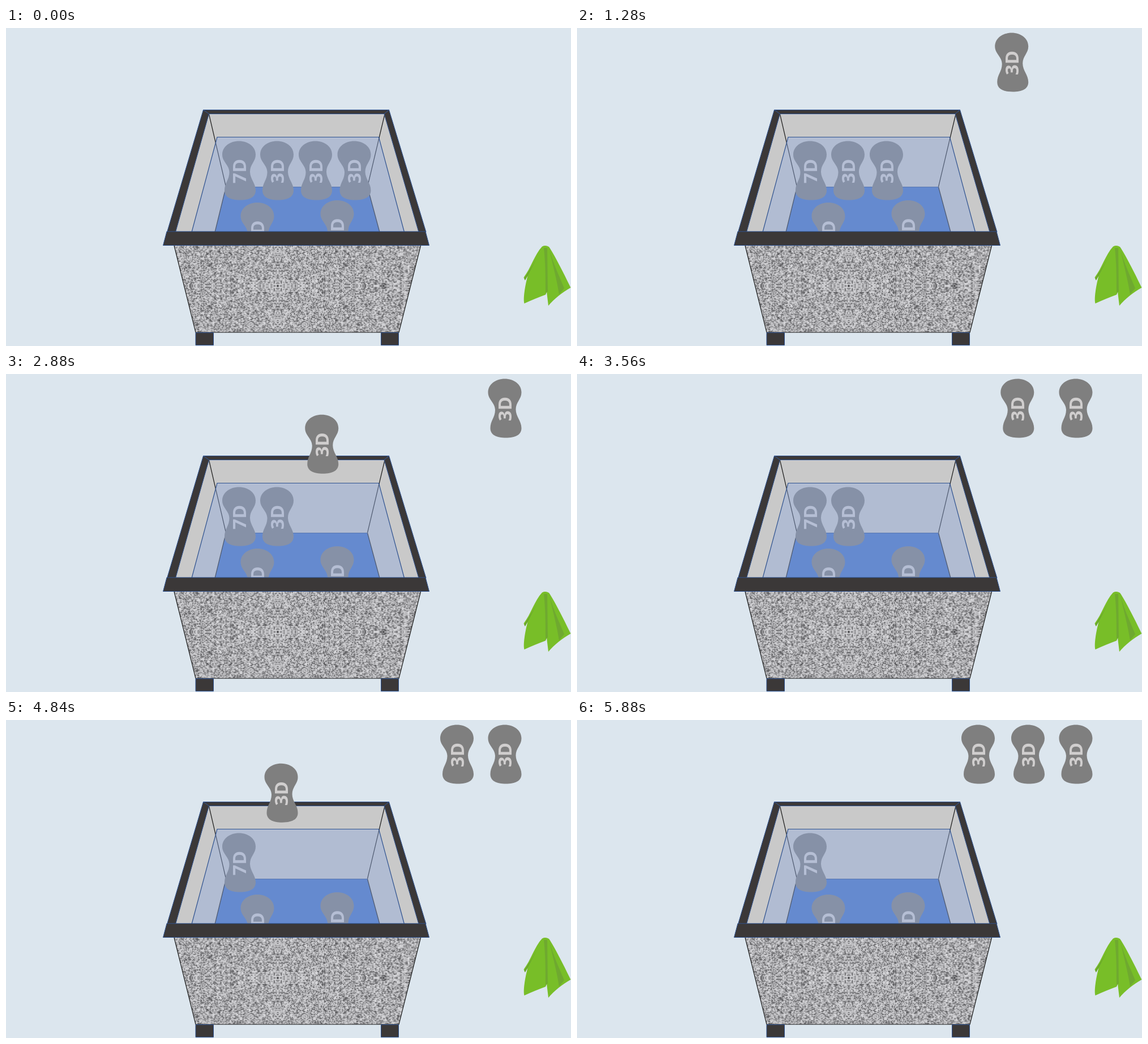
These frames come from a looping animation (998x561 px, 5.92 s). An HTML page with a canvas:

```html
<!DOCTYPE html>
<html lang="en">
<head>
<meta charset="utf-8">
<title>Insoles leaving the bath</title>
<style>
  html, body { margin: 0; width: 100%; height: 100%; overflow: hidden; background: #dce6ee; }
  canvas, svg { position: absolute; left: 0; top: 0; width: 998px; height: 561px; }
  canvas { clip-path: polygon(297px 384px, 732.5px 384px, 694px 537px, 335px 537px); }
  .line { fill: none; stroke: #2f528f; stroke-width: 1.2; }
  .edge { fill: none; stroke: #1c1c1c; stroke-width: 1.2; }
  .dark { fill: #3b3838; stroke: #2f528f; stroke-width: 1; }
  text { font: 700 33px "Open Sans", "Noto Sans", sans-serif; fill: #d0cece; text-anchor: middle; }
</style>
</head>
<body>
<canvas id="granite" width="998" height="561"></canvas>
<svg viewBox="0 0 998 561">
  <defs>
    <path id="sole" fill="#7f7f7f" d="M29.5 0C46 0 59 10 59 24C59 36 49 41 49 54C49 67 59 74 59 87C59 99 48 104 31.5 104C15 104 4 99 4 87C4 74 12.5 68 12.5 55C12.5 42 0 37 0 24C0 10 13 0 29.5 0Z"/>
    <clipPath id="inside"><path d="M0 0H998V359H0Z"/></clipPath>
  </defs>

  <!-- inner walls and floor -->
  <path fill="#c9c9c9" d="M358 151H669L730 360H299Z"/>
  <path class="edge" d="M358.500 152L388.500 280M669 152L638.500 280"/>
  <path fill="#4472c4" d="M388.500 280.500H638.500L660 360H369Z"/>
  <path class="line" d="M388.500 280.500H638.500"/>
  <path class="edge" d="M388.500 280.500L369 360M638.500 280.500L660 360"/>

  <!-- back and side rims -->
  <path class="dark" d="M348.500 144.500H676.500L668 151.500H358.500Z"/>
  <path class="dark" d="M348.500 144.500L358.500 151.500L299.500 360H284.500Z"/>
  <path class="dark" d="M676.500 144.500L668 151.500L729 360H742Z"/>

  <g id="soles" clip-path="url(#inside)"></g>

  <!-- water -->
  <path fill="#8faadc" fill-opacity=".43" d="M373 192.500H658.500L703.500 360H328Z"/>
  <path class="line" d="M328 360L373 192.500H658.500L703.500 360"/>

  <!-- front -->
  <path class="edge" d="M297 384L335 537H694L732.500 384"/>
  <path class="dark" d="M284 359H741L747.500 383.500H277.500Z"/>
  <path class="dark" d="M335 537.500H366.500V559.500H335Z"/>
  <path class="dark" d="M662.500 537.500H693.500V559.500H662.500Z"/>

  <!-- cloth -->
  <path fill="#78be28" d="M947 385.500Q953 382.500 959 386C967 397 985 432 997.500 458C983 466 968 478 958 490L955 465L953 470.500C941 475 928 480 915.500 486C913 475 918 450 921.500 437L916.500 445L914.500 440C927 424 934 399 947 385.500Z"/>
  <path fill="#6aa52c" d="M938 405L930 419L915.500 442L917 445L922 436Z"/>
  <path fill="#6fa930" d="M950 388L956 388L957 465L955 466L953 470C953 440 953 415 950 388Z"/>
  <path fill="#6fa930" d="M960 391C966 414 977 437 986 459L977 470C973 443 965 416 960 391Z"/>
</svg>

<script>
const NS = "http://www.w3.org/2000/svg";
const LOOP = 5920, STEP = 40, TURN = 1960, RISE = 191;

function make(tag, attrs, parent) {
  const el = document.createElementNS(NS, tag);
  for (const key in attrs) el.setAttribute(key, attrs[key]);
  if (parent) parent.appendChild(el);
  return el;
}

function addSole(x, y, label) {
  const g = make("g", { transform: `translate(${x} ${y})` }, document.getElementById("soles"));
  make("use", { href: "#sole" }, g);
  make("text", { transform: "translate(41.5 53) rotate(-90)" }, g).textContent = label;
  return g;
}

// Straight up, a rounded turn, then straight right.
function turnPath(x, y, w) {
  const px = k => x + w * k, py = k => y - RISE * k;
  return make("path", { d: `M${x} ${y}L${x} ${py(.5)}C${x} ${py(.724)} ${px(.276)} ${py(1)} ${px(.5)} ${py(1)}L${px(1)} ${py(1)}` });
}

// Time in ms and share of the way covered.
const pace = [
  [0, 0], [160, .003], [280, .014], [480, .063], [640, .139], [920, .334], [1080, .502],
  [1280, .72], [1520, .915], [1600, .952], [1680, .977], [1840, .998], [1920, 1]
];

function slope(i) {
  if (i === 0 || i === pace.length - 1) return 0;
  const [a, b] = [pace[i - 1], pace[i + 1]];
  return (b[1] - a[1]) / (b[0] - a[0]);
}

function progress(t) {
  if (t <= 0) return 0;
  const i = pace.findIndex(p => p[0] > t) - 1;
  if (i < 0) return 1;
  const [t0, p0] = pace[i], [t1, p1] = pace[i + 1];
  const d = t1 - t0, u = (t - t0) / d, v = 1 - u;
  return p0 * v * v * (1 + 2 * u) + p1 * u * u * (3 - 2 * u)
    + d * u * v * (slope(i) * v - slope(i + 1) * u);
}

// One speckled tile, mirrored into the four quarters of the front.
function drawGranite() {
  const w = 144, h = 60, tileW = 256, tileH = 106;
  const tile = document.createElement("canvas");
  tile.width = w;
  tile.height = h;
  const tc = tile.getContext("2d");
  let seed = 7;
  const rand = () => (seed = seed * 16807 % 2147483647) / 2147483647;
  for (let y = 0; y < h; y++) {
    for (let x = 0; x < w; x++) {
      const v = Math.round(66 + 162 * Math.pow(rand(), .6));
      tc.fillStyle = `rgb(${v},${v},${v + 3})`;
      tc.fillRect(x, y, 1, 1);
    }
  }
  const ctx = document.getElementById("granite").getContext("2d");
  for (const fx of [-1, 1]) {
    for (const fy of [-1, 1]) {
      ctx.setTransform(fx, 0, 0, fy, 480, 455);
      ctx.drawImage(tile, 0, 0, tileW, tileH);
    }
  }
}

drawGranite();
addSole(382, 199.5, "7D");
addSole(414.5, 308, "3D");
addSole(555.5, 304, "3D");

const movers = [[585.5, 266], [517, 250], [449, 230]].map(([x, w], i) => {
  const path = turnPath(x, 199.5, w);
  return { el: addSole(x, 199.5, "3D"), path, length: path.getTotalLength(), start: i * TURN };
});

function draw() {
  const t = Math.floor(performance.now() % LOOP / STEP) * STEP;
  for (const m of movers) {
    const p = m.path.getPointAtLength(m.length * progress(t - m.start));
    m.el.setAttribute("transform", `translate(${p.x.toFixed(2)} ${p.y.toFixed(2)})`);
  }
  requestAnimationFrame(draw);
}
draw();
</script>
</body>
</html>
```
